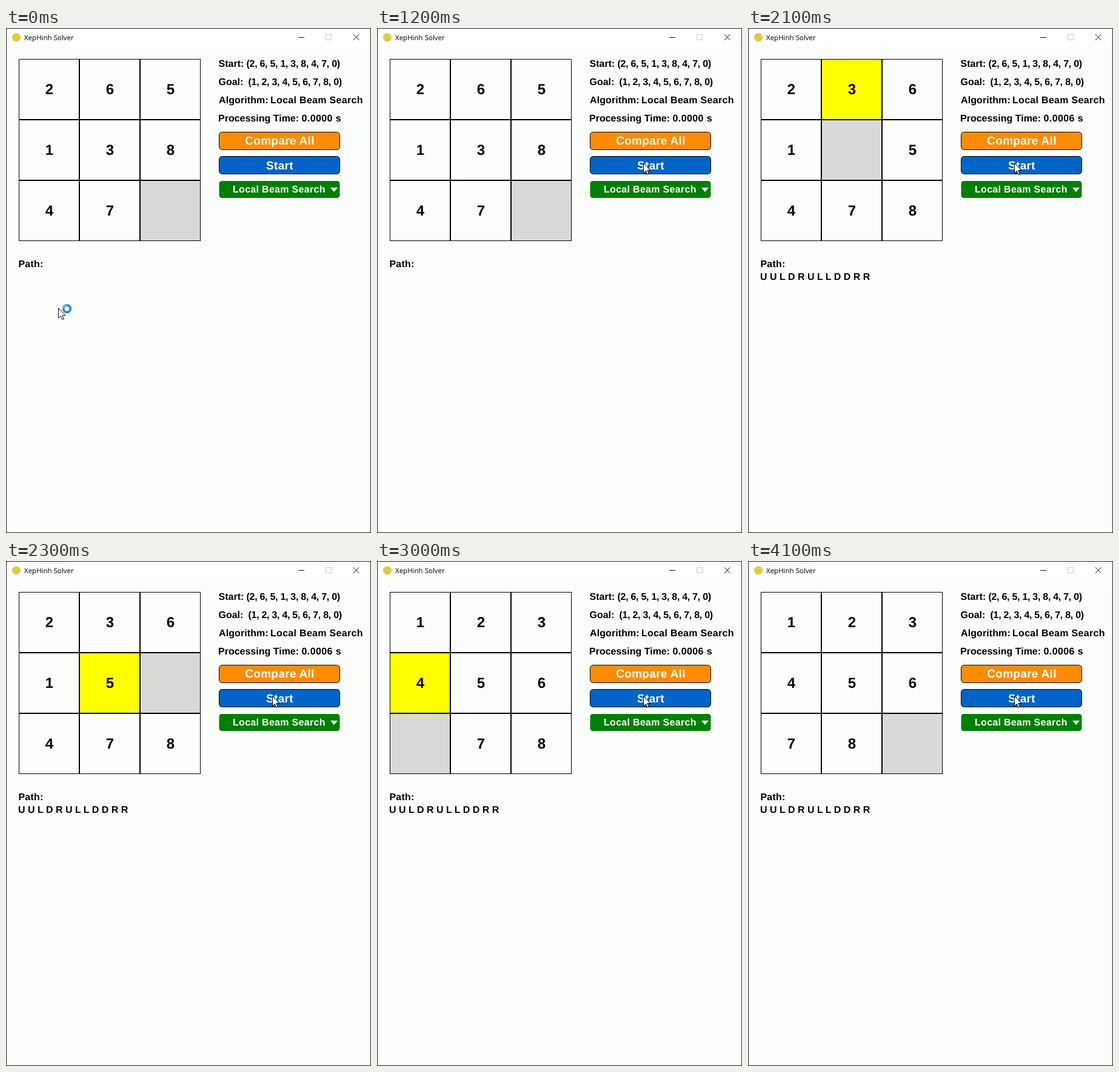
An HTML page that plays this animation: 602x832 px, repeating every 4300 ms.

```html
<!DOCTYPE html>
<html lang="en">
<head>
<meta charset="utf-8">
<title>XepHinh Solver</title>
<style>
  html, body { margin: 0; width: 100%; height: 100%; overflow: hidden; background: #fdfffc; }
  svg { display: block; width: 602px; height: 832px; }
  text {
    font: bold 16px "Liberation Sans", Arial, sans-serif;
    text-rendering: geometricPrecision;
    white-space: pre;
  }
  .caption { font: 11.5px "Open Sans", "Noto Sans", sans-serif; }
  .button { font-size: 19px; letter-spacing: .3px; fill: #fff; text-anchor: middle; }
  .wide { letter-spacing: .3px; }
  .tight { letter-spacing: -.28px; }
  .time { letter-spacing: .4px; }
  .digit { font-size: 24px; text-anchor: middle; }
  .outline { stroke: #000; }
</style>
</head>
<body>
<svg viewBox="0 0 602 832">
  <rect width="602" height="832" fill="#fdfffc"/>
  <rect x="1" y="1" width="600" height="30" fill="#fff"/>
  <rect class="outline" x=".5" y=".5" width="601" height="831" fill="none" style="stroke:#222"/>

  <circle cx="17" cy="15.5" r="7" fill="#e2cc3c"/>
  <text class="caption" x="30" y="20">XepHinh Solver</text>
  <g fill="none" stroke="#111">
    <path d="M482 15.5h10"/>
    <rect x="527.5" y="10.5" width="9" height="9" stroke="#ccc"/>
    <path d="M573 10.5l9.5 9.5M582.5 10.5l-9.5 9.5"/>
  </g>

  <g id="board"></g>

  <text x="350.5" y="64">Start:</text>
  <text class="tight" x="396.5" y="64">(2, 6, 5, 1, 3, 8, 4, 7, 0)</text>
  <text x="350.5" y="94">Goal:</text>
  <text class="tight" x="399.5" y="94">(1, 2, 3, 4, 5, 6, 7, 8, 0)</text>
  <text x="351" y="124" style="letter-spacing:.1px">Algorithm:</text>
  <text class="wide" x="436" y="124">Local Beam Search</text>
  <text x="350" y="154">Processing Time:</text>
  <text class="time" id="time" x="487.5" y="154"></text>

  <rect class="outline" x="351.5" y="171.5" width="199" height="29" rx="5" fill="#ff8c00"/>
  <text class="button" x="451.5" y="192">Compare All</text>
  <rect class="outline" x="351.5" y="211.5" width="199" height="29" rx="5" fill="#0064c8"/>
  <text class="button" x="451.5" y="233">Start</text>
  <rect x="351.5" y="252" width="199" height="28" rx="4.5" fill="#008000"/>
  <text class="wide" x="374" y="271" fill="#fff">Local Beam Search</text>
  <path d="M535 263h12l-6 7z" fill="#fff"/>

  <text x="20.5" y="394" style="letter-spacing:.2px">Path:</text>
  <text id="path" x="20" y="415"></text>

  <g id="cursor">
    <path class="outline" fill="#fff" d="M0 0V16.5L3.8 13L6.3 18.8L8.8 17.7L6.3 12H11.5Z"/>
    <g id="busy" fill="none" stroke-width="4">
      <circle cx="14" cy="1" r="5.8" stroke="#2f86dc"/>
      <path d="M8.2 1A5.8 5.8 0 0 1 14 -4.8" stroke="#62b4f2"/>
    </g>
  </g>
</svg>
<script>
const LOOP = 4300, FRAME = 100;
const SOLVED_AT = 1600, MOVE_TIME = 150;
const MOVES = 'UULDRULLDDRR';
const OFFSET = { U: -3, D: 3, L: -1, R: 1 };
// time, x, y of the pointer tip
const POINTER = [[0, 86.5, 461.5], [600, 486, 252], [700, 439.5, 222.5]];
const BUSY_UNTIL = 300;

const byId = id => document.getElementById(id);

function add(parent, tag, attributes) {
  const node = document.createElementNS('http://www.w3.org/2000/svg', tag);
  for (const key in attributes) node.setAttribute(key, attributes[key]);
  return parent.appendChild(node);
}

const cells = Array.from({ length: 9 }, (_, i) => {
  const x = 21 + i % 3 * 100, y = 51 + Math.floor(i / 3) * 100;
  return {
    box: add(byId('board'), 'rect', { class: 'outline', x: x + .5, y: y + .5, width: 99, height: 99 }),
    label: add(byId('board'), 'text', { class: 'digit', x: x + 50.5, y: y + 58 })
  };
});

// Each state holds the tiles and the cell of the tile that moved last.
const states = [{ tiles: [2, 6, 5, 1, 3, 8, 4, 7, 0], moved: -1 }];
for (const move of MOVES) {
  const tiles = [...states.at(-1).tiles];
  const blank = tiles.indexOf(0), next = blank + OFFSET[move];
  [tiles[blank], tiles[next]] = [tiles[next], 0];
  states.push({ tiles, moved: blank });
}
states.push({ tiles: states.at(-1).tiles, moved: -1 });

function pointerAt(t) {
  const i = POINTER.findIndex(p => p[0] > t);
  if (i < 0) return POINTER.at(-1).slice(1);
  const [t0, x0, y0] = POINTER[i - 1], [t1, x1, y1] = POINTER[i];
  const u = (t - t0) / (t1 - t0), eased = u * u * (3 - 2 * u);
  return [x0 + (x1 - x0) * eased, y0 + (y1 - y0) * eased];
}

function draw(t) {
  const solved = t >= SOLVED_AT;
  const step = solved ? Math.floor((t - SOLVED_AT) / MOVE_TIME) + 1 : 0;
  const { tiles, moved } = states[Math.min(step, states.length - 1)];
  cells.forEach(({ box, label }, i) => {
    box.setAttribute('fill', !tiles[i] ? '#d8dad8' : i === moved ? '#ff0' : '#fdfffc');
    label.textContent = tiles[i] || '';
  });
  byId('time').textContent = solved ? '0.0006 s' : '0.0000 s';
  byId('path').textContent = solved ? [...MOVES].join(' ') : '';
  byId('cursor').setAttribute('transform', `translate(${pointerAt(t)})`);
  byId('busy').setAttribute('visibility', t < BUSY_UNTIL ? 'visible' : 'hidden');
}

const begin = performance.now();
function tick() {
  const t = (performance.now() - begin) % LOOP;
  draw(Math.floor(t / FRAME) * FRAME);
  requestAnimationFrame(tick);
}
tick();
</script>
</body>
</html>
```
